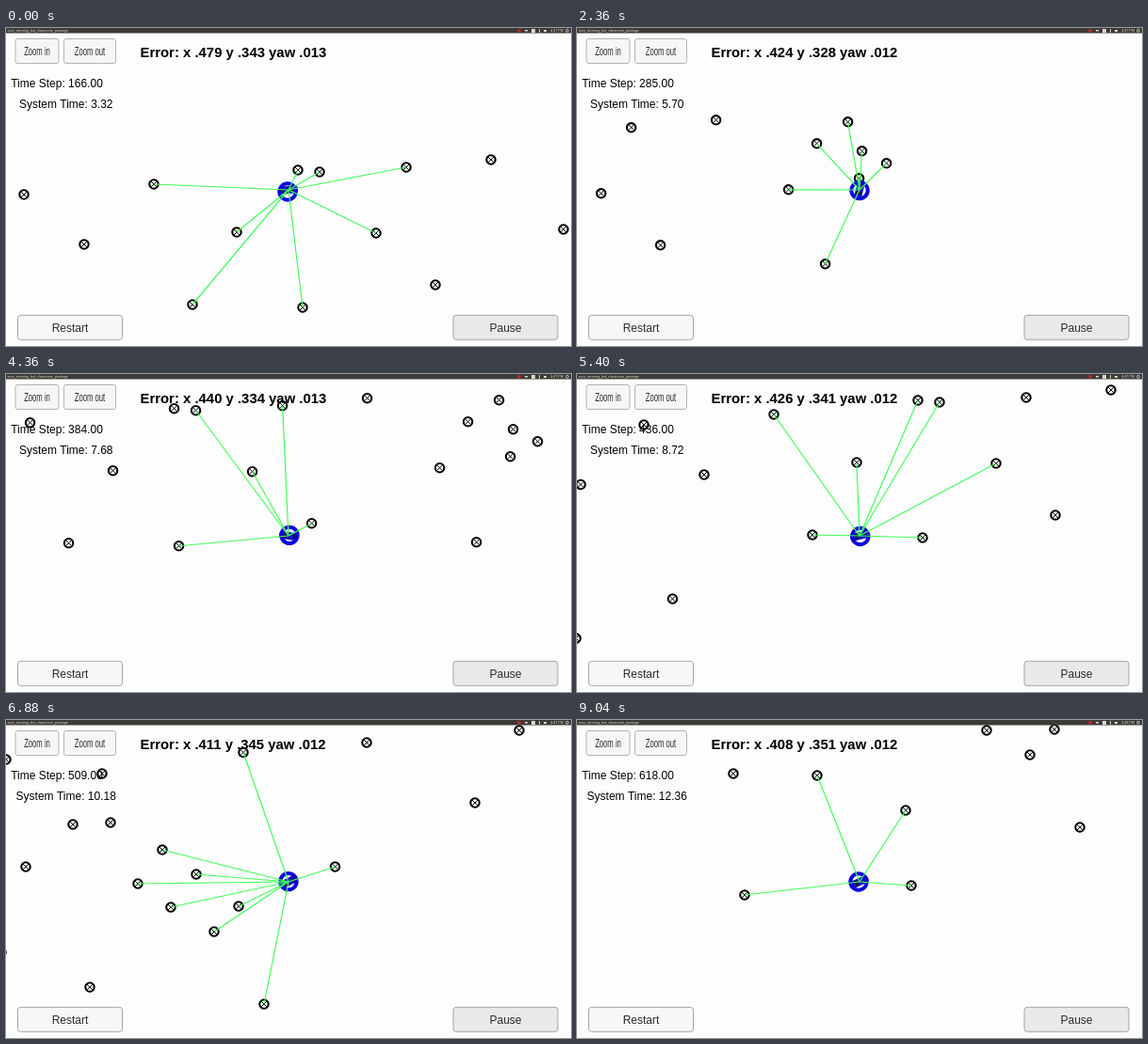
Write an HTML page with a canvas that moves like this. It is 600x338 px and loops after 9080 ms.

```html
<!DOCTYPE html>
<html lang="en">
<head>
<meta charset="utf-8">
<title>Localization simulator</title>
<style>
html, body { margin: 0; width: 100%; height: 100%; overflow: hidden; background: #fdfdfd; }
canvas { display: block; }
</style>
</head>
<body>
<canvas id="stage" width="600" height="338"></canvas>
<script>
const ctx = document.getElementById('stage').getContext('2d');
const LOOP = 9080, FRAME = 40, RANGE = 167;
const CAR = { x: 300, y: 172 };
const SANS = '"Liberation Sans", Arial, sans-serif';

// Map points, in the stage coordinates of the first moment
const landmarks = [
  [19, 177], [83, 230], [157, 166], [245, 217], [198, 294], [315, 297], [310, 151], [333, 153],
  [425, 148], [393, 218], [456, 273], [515, 140], [592, 214], [631, 293], [622, 165], [655, 142],
  [670, 173], [667, 202], [696, 186], [49.5, 362], [-53, 404], [-48, 240.5], [-300, 248],
  [-198, 263], [-229, 317], [-189, 315], [-279, 362], [-134, 344], [-98, 370], [-160, 380],
  [-125, 405], [-79, 431], [-26, 508], [-211, 490], [-394, 451], [-305, 453], [-205, 570], [-382, 580]
];

// Key points of the drive: time, x, y
const route = [
  [0, 0, 0], [1400, 290.3, -21], [2200, 367, 27], [2800, 341, 92], [3320, 302, 139],
  [4600, 90, 110], [5400, -52, 123], [6880, -300, 206], [7680, -403.5, 300],
  [8320, -490, 362], [9040, -560, 394]
];

// Cubic Hermite curve; slopes come from the neighbouring points
function position(t) {
  const last = route.length - 1;
  const i = Math.max(0, Math.min(last - 1, route.findLastIndex(p => p[0] <= t)));
  const a = route[i], b = route[i + 1];
  const before = route[Math.max(i - 1, 0)], after = route[Math.min(i + 2, last)];
  const h = b[0] - a[0], u = (t - a[0]) / h, w = 1 - u;
  return [1, 2].map(k => {
    const ma = (b[k] - before[k]) / (b[0] - before[0]) * h;
    const mb = (after[k] - a[k]) / (after[0] - a[0]) * h;
    return (1 + 2 * u) * w * w * a[k] + u * w * w * ma
      + u * u * (3 - 2 * u) * b[k] - u * u * w * mb;
  });
}

const bump = (t, center, width) => Math.exp(-(((t - center) / width) ** 2));
const wave = (t, period) => Math.cos(2 * Math.PI * t / period);

// One step per 20 ms, with a slight drift of the recording clock
const stepAt = t => Math.round(166 + t / 20 + .65 * wave(t - 3000, 8000));

function errorAt(t) {
  const x = .408 + .071 * Math.exp(-t / 643) + .0336 * bump(t, 4010, 1785);
  const y = .3438 + .0072 * (t / 9040) ** 6 - .0176 * bump(t, 2950, 1800);
  return { x, y, yaw: .012 + .015 * (x - .4) };
}

function text(str, x, y, size, color = '#000', align = 'left', weight = '') {
  ctx.font = `${weight} ${size}px ${SANS}`;
  ctx.textAlign = align;
  ctx.fillStyle = color;
  ctx.fillText(str, x, y);
}

function circle(x, y, r) {
  ctx.beginPath();
  ctx.arc(x, y, r, 0, 2 * Math.PI);
}

function line(x1, y1, x2, y2) {
  ctx.beginPath();
  ctx.moveTo(x1, y1);
  ctx.lineTo(x2, y2);
  ctx.stroke();
}

// squash narrows the whole button, label included
function button(label, cx, cy, w, h, fill, squash = 1) {
  ctx.save();
  ctx.translate(cx, cy);
  ctx.scale(squash, 1);
  ctx.beginPath();
  ctx.roundRect(-w / squash / 2, -h / 2, w / squash, h, 3);
  ctx.fillStyle = fill;
  ctx.fill();
  ctx.strokeStyle = '#a4a4a4';
  ctx.lineWidth = 1;
  ctx.stroke();
  text(label, 0, 4.3, 12, '#2c2c2c', 'center');
  ctx.restore();
}

function landmark(x, y) {
  ctx.strokeStyle = '#000';
  ctx.lineWidth = 2.1;
  circle(x, y, 4.7);
  ctx.stroke();
  ctx.lineWidth = 1;
  line(x - 3, y - 3, x + 3, y + 3);
  line(x - 3, y + 3, x + 3, y - 3);
}

function car(t) {
  const [ax, ay] = position(t - 10), [bx, by] = position(t + 10);
  ctx.save();
  ctx.translate(CAR.x, CAR.y);
  ctx.rotate(Math.atan2(by - ay, bx - ax));
  ctx.fillStyle = '#1a12c8';
  ctx.beginPath();
  ctx.roundRect(-10, -4, 20, 8, 3);
  ctx.fill();
  ctx.fillStyle = '#14143c';
  ctx.fillRect(2, -3, 3, 6);
  ctx.fillRect(-7, -3, 2, 6);
  ctx.restore();

  // The estimate wobbles around the car and settles
  const dx = -wave(t, 9040), dy = 2 * wave(t, 2800) * Math.exp(-t / 4000);
  ctx.strokeStyle = '#0a05e0';
  ctx.lineWidth = 4;
  circle(CAR.x + dx, CAR.y + dy, 8.7);
  ctx.stroke();
}

function menuBar(t) {
  const pale = '#dcd8cc';
  ctx.fillStyle = '#3c3a36';
  ctx.fillRect(0, 0, 600, 5.5);
  text('auto_steering_bot_classroom_package', 1.5, 3.9, 3.7, pale);
  ctx.fillStyle = '#d22';
  circle(545, 2.8, 1.7);
  ctx.fill();
  ctx.fillStyle = pale;
  ctx.fillRect(551, 2, 3, 1.5);
  ctx.fillRect(558, 1, 4, 4);
  ctx.fillRect(566, 1.2, 1, 3.4);
  ctx.fillRect(571, 2, 3, 2);
  text(t < 8680 ? '4:47 PM' : '4:48 PM', 585, 4.1, 3.6, pale, 'center');
  ctx.strokeStyle = pale;
  ctx.lineWidth = .8;
  circle(596, 2.8, 1.4);
  ctx.stroke();
}

function draw(t) {
  const [ox, oy] = position(t);
  const points = landmarks.map(([x, y]) => [x - ox, y - oy]);
  const step = stepAt(t), error = errorAt(t);

  ctx.fillStyle = '#fdfdfd';
  ctx.fillRect(0, 0, 600, 338);

  points.forEach(([x, y]) => landmark(x, y));
  car(t);
  ctx.strokeStyle = '#3dff55';
  ctx.lineWidth = 1.2;
  for (const [x, y] of points) {
    if (Math.hypot(x - CAR.x, y - CAR.y) < RANGE) line(CAR.x, CAR.y, x, y);
  }

  button('Zoom in', 33, 24.5, 46, 26, '#f6f6f6', .64);
  button('Zoom out', 89, 24.5, 55, 26, '#f6f6f6', .64);
  button('Restart', 68, 318.3, 111, 26, '#f7f7f7');
  button('Pause', 530.5, 318.3, 111, 26, '#e9e9e9');

  const short = v => v.toFixed(3).slice(1);
  text(`Error: x ${short(error.x)} y ${short(error.y)} yaw ${short(error.yaw)}`,
    142.5, 31.2, 14.9, '#000', 'left', 'bold');
  text(`Time Step: ${step}.00`, 54, 63, 12, '#000', 'center');
  text(`System Time: ${(step / 50).toFixed(2)}`, 63.7, 85.2, 12, '#000', 'center');
  menuBar(t);
}

const start = performance.now();
function tick() {
  const t = (performance.now() - start) % LOOP;
  draw(Math.floor(t / FRAME) * FRAME);
  requestAnimationFrame(tick);
}
tick();
</script>
</body>
</html>
```
